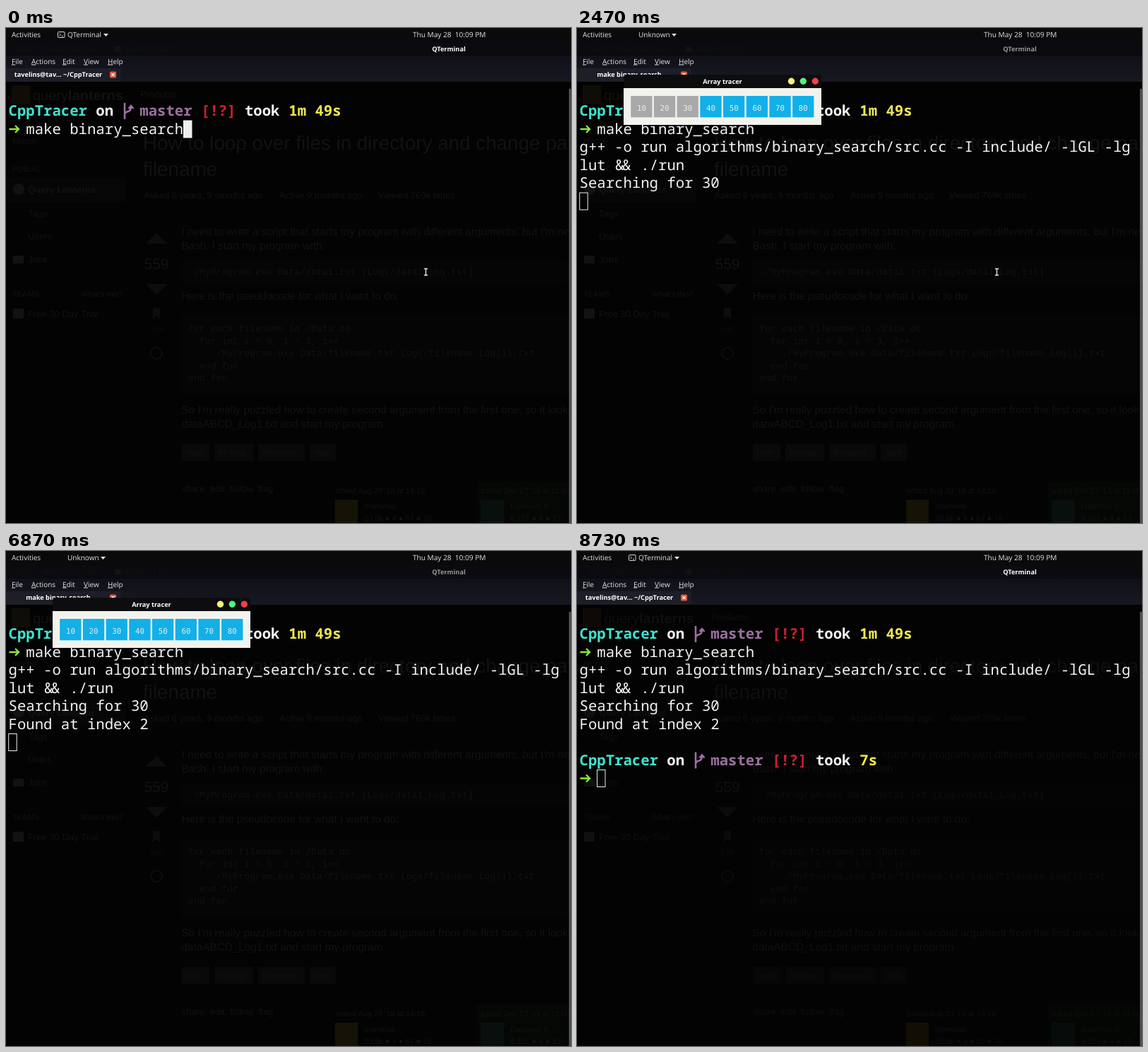
These frames come from a looping animation (800x700 px, 9790 ms). An HTML page:

```html
<!DOCTYPE html>
<html lang="en">
<head>
<meta charset="utf-8">
<title>Binary search tracer</title>
<style>
html, body { margin: 0; width: 100%; height: 100%; overflow: hidden; background: #000; }
svg { display: block; width: 800px; height: 700px; }
text { white-space: pre; text-rendering: geometricPrecision; }
.ui { font: 10px "Open Sans", "Noto Sans", sans-serif; fill: #e4e4e4; }
.b { font-weight: 700; font-size: 9.2px; fill: #fff; }
.mid { text-anchor: middle; }
.u { text-decoration: underline; }
.term { font: 20.65px "Noto Sans Mono", "DejaVu Sans Mono", monospace; fill: #f4f4f4; }
.prompt { font-weight: 700; }
.teal { fill: #41e2d0; }
.purple { fill: #9c6f9f; }
.red { fill: #cf2030; }
.yellow { fill: #efe64c; }
.page { font: 15.3px "Liberation Sans", Arial, sans-serif; fill: #111211; }
.page .s { font-size: 13px; }
.page .xs { font-size: 11px; }
.page .code { font: 13.2px "Liberation Mono", monospace; }
.page .icon { fill: #0c0d0c; }
.cell text { font: 10.8px "DejaVu Sans Mono", monospace; fill: #e4eef2; text-anchor: middle; }
</style>
</head>
<body>
<svg viewBox="0 0 800 700">
  <defs>
    <linearGradient id="bar" x2="0" y2="1">
      <stop offset="0" stop-color="#101018"/><stop offset="1" stop-color="#181822"/>
    </linearGradient>
    <g id="arrow" fill="none" stroke="#8fe834" stroke-width="2.3">
      <path d="M4.5 143H18M13 138L18 143L13 148"/>
    </g>
    <g id="prompt" class="term prompt">
      <text x="3.5" y="124"><tspan class="teal">CppTracer</tspan> on</text>
      <path d="M168 106V129M168 123Q168 119 173 118Q177 117 177 111M173.500 114L177 110L180.500 114" fill="none" stroke="#9c6f9f" stroke-width="2.6"/>
      <text x="189.300" y="124"><tspan class="purple">master</tspan> <tspan class="red">[!?]</tspan> took</text>
    </g>
  </defs>

  <rect width="800" height="700" fill="#020302"/>

  <!-- web page showing faintly through the terminal -->
  <g id="page" class="page">
    <rect x="8" y="81" width="26" height="27" fill="#100c07"/>
    <text x="38" y="102" font-size="20">query<tspan font-weight="700">lanterns</tspan></text>
    <text class="s" x="190" y="98">Products</text>
    <rect y="212" width="169" height="34" fill="#050605"/>
    <text class="s" x="9" y="164">Home</text>
    <text class="xs" x="9" y="203">PUBLIC</text>
    <circle cx="18" cy="228" r="8"/>
    <text class="s" x="31" y="233" font-weight="700">Query Lanterns</text>
    <text class="s" x="31" y="267">Tags</text>
    <text class="s" x="31" y="299">Users</text>
    <rect x="10" y="322" width="15" height="11"/>
    <text class="s" x="31" y="332">Jobs</text>
    <text class="xs" x="9" y="380">TEAMS</text>
    <text class="xs" x="106" y="380">What's this?</text>
    <rect x="10" y="397" width="15" height="14"/>
    <text class="s" x="31" y="409">Free 30 Day Trial</text>

    <g font-size="27.8">
      <text x="194" y="172">How to loop over files in directory and change path and</text>
      <text x="194" y="209">filename</text>
    </g>
    <text class="s" x="195" y="241">Asked 6 years, 9 months ago</text>
    <text class="s" x="387" y="241">Active 9 months ago</text>
    <text class="s" x="527" y="241">Viewed 769k times</text>
    <path class="icon" d="M198 305L213 290L228 305ZM198 362H228L213 377ZM208 396H218V412L213 407L208 412Z"/>
    <text class="mid" x="213" y="341" font-size="21">559</text>
    <text class="mid xs icon" x="213" y="430">188</text>
    <circle cx="213" cy="460" r="8" fill="none" stroke="#0c0d0c" stroke-width="2"/>

    <text x="248.500" y="293">I need to write a script that starts my program with different arguments, but I'm new to</text>
    <text x="248.500" y="313">Bash. I start my program with:</text>
    <rect x="248" y="329" width="552" height="32" fill="#040504"/>
    <text class="code" x="258" y="349">./MyProgram.exe Data/data1.txt [Logs/data1_Log.txt]</text>
    <text x="248.500" y="384">Here is the pseudocode for what I want to do:</text>
    <rect x="248" y="407" width="552" height="110" fill="#040504"/>
    <text class="code" x="258" y="429">for each filename in /Data do</text>
    <text class="code" x="258" y="447">  for int i = 0, i = 3, i++</text>
    <text class="code" x="258" y="464">    ./MyProgram.exe Data/filename.txt Logs/filename_Log{i}.txt</text>
    <text class="code" x="258" y="482">  end for</text>
    <text class="code" x="258" y="499">end for</text>
    <text x="248.500" y="545">So I'm really puzzled how to create second argument from the first one, so it looks like</text>
    <text x="248.500" y="565">dataABCD_Log1.txt and start my program.</text>
    <path d="M249 588H288V612H249ZM295 588H350V612H295ZM357 588H423V612H357ZM430 588H467V612H430Z" fill="#080908"/>
    <text class="xs" x="255" y="604">bash</text>
    <text class="xs" x="301" y="604">for-loop</text>
    <text class="xs" x="363" y="604">filenames</text>
    <text class="xs" x="436" y="604">shell</text>
    <text class="s" x="249" y="656">share  edit  follow  flag</text>
    <rect x="667" y="641" width="133" height="59" fill="#050705"/>
    <text class="xs" x="466" y="658">edited Aug 20 '18 at 14:18</text>
    <text class="xs" x="672" y="658">asked Dec 27 '13 at 11:00</text>
    <rect x="466" y="667" width="32" height="33" fill="#151306"/>
    <rect x="672" y="667" width="33" height="33" fill="#080f0d"/>
    <text class="xs" x="507" y="680">mornelak</text>
    <text class="xs" x="507" y="697">20.8k ● 4 ● 67 ● 76</text>
    <text class="xs" x="714" y="680">Dalvenor B</text>
    <text class="xs" x="714" y="697">6,101 ● 4 ● 13</text>
  </g>

  <!-- desktop bar and terminal chrome -->
  <rect width="800" height="20" fill="#0a0a0b"/>
  <rect y="20" width="800" height="20" fill="#0a0a0f"/>
  <g class="page">
    <text class="xs" x="18" y="34">bash - How to loop over</text>
    <circle cx="158" cy="30" r="5"/>
    <text class="xs" x="168" y="34">tavelins's files</text>
  </g>
  <rect y="39" width="800" height="37" fill="url(#bar)"/>
  <rect y="57" width="162" height="19" fill="#1e1e28"/>
  <rect x="797" y="86" width="3" height="614" fill="#4e4e50"/>
  <g class="ui">
    <text x="8" y="13.300">Activities</text>
    <text x="576" y="13.300" font-size="10.1">Thu May 28  10:09 PM</text>
    <g data-on="0-1330 7730-9790">
      <rect x="73.500" y="5.500" width="9.500" height="8" rx="1" fill="none" stroke="#d8d8d8"/>
      <path d="M75.500 7.500L77.500 9.500L75.500 11.500M79 11.500H81" fill="none" stroke="#d8d8d8"/>
      <text x="87" y="13.300">QTerminal</text>
      <path d="M138 8H145L141.500 12Z"/>
    </g>
    <g data-on="1330-7730">
      <text x="87" y="13.300">Unknown</text>
      <path d="M134 8H141L137.500 12Z"/>
    </g>
    <text id="title" class="b mid" x="627" y="32.500">QTerminal</text>
    <text x="8" y="50.500"><tspan class="u">F</tspan>ile</text>
    <text x="36" y="50.500"><tspan class="u">A</tspan>ctions</text>
    <text x="80" y="50.500"><tspan class="u">E</tspan>dit</text>
    <text x="110" y="50.500"><tspan class="u">V</tspan>iew</text>
    <text x="144" y="50.500"><tspan class="u">H</tspan>elp</text>
    <text class="b mid" x="74" y="69" data-on="0-470 7800-9790">tavelins@tav... ~/CppTracer</text>
    <text class="b mid" x="74" y="69" data-on="470-7800">make binary_search</text>
    <rect x="147" y="61.500" width="9" height="9" rx="1.500" fill="#dc5a3e"/>
    <path d="M149.500 64L153.500 68M153.500 64L149.500 68" stroke="#fff" stroke-width="1.200"/>
  </g>

  <!-- terminal contents -->
  <use href="#prompt"/>
  <text class="term prompt yellow" x="400.300" y="124">1m 49s</text>
  <use href="#arrow"/>
  <g class="term">
    <text x="28.300" y="149.500">make binary_search</text>
    <g data-on="530-9790">
      <text x="3.500" y="175">g++ -o run algorithms/binary_search/src.cc -I include/ -lGL -lg</text>
      <text x="3.500" y="200.500">lut</text>
      <text x="54" y="200.500" letter-spacing="-2.5">&amp;&amp;</text>
      <text x="90.300" y="200.500">./run</text>
    </g>
    <text x="3.500" y="226" data-on="1400-9790">Searching for 30</text>
    <text x="3.500" y="251.500" data-on="6130-9790">Found at index 2</text>
  </g>
  <g data-on="7730-9790">
    <use href="#prompt" y="178.500"/>
    <text class="term prompt yellow" x="400.300" y="302.500">7s</text>
    <use href="#arrow" y="178.500"/>
  </g>
  <rect id="caret" width="11.500" height="24" stroke="#eee"/>

  <g id="win">
    <path d="M66 85V70Q66 66 70 66H342Q346 66 346 70V85Z" fill="#0d0d0f"/>
    <rect x="66" y="85" width="280" height="52" fill="#f3f3ee"/>
    <text class="ui b mid" x="206" y="79">Array tracer</text>
    <circle cx="303.500" cy="75.300" r="4.700" fill="#f3f27c"/>
    <circle cx="320.300" cy="75.300" r="4.700" fill="#55f27a"/>
    <circle cx="337.300" cy="75.300" r="4.700" fill="#f0404c"/>
    <g id="cells"></g>
  </g>

  <g id="mouse">
    <g id="beam" fill="none" stroke-linecap="square">
      <path d="M-2 -4.500H2M0 -4.500V4.500M-2 4.500H2" stroke="#000" stroke-width="3"/>
      <path d="M-2 -4.500H2M0 -4.500V4.500M-2 4.500H2" stroke="#eee" stroke-width="1.300"/>
    </g>
    <path id="resize" d="M-6 0L-1.500 -4V4ZM6 0L1.500 -4V4Z" fill="#111" stroke="#ddd" stroke-width=".8"/>
  </g>
</svg>
<script>
const LOOP = 9790, STEP = 200 / 3;
const NS = 'http://www.w3.org/2000/svg';
const $ = id => document.getElementById(id);
const show = (el, on) => { el.style.display = on ? '' : 'none'; };

// Times at which each cell turns blue; the found one turns gray again for a while.
const visited = [4270, 3400, 5130, 1600, 2470, 2470, 2470, 2470];
const isGray = (i, t) => t < visited[i] || (i === 2 && t >= 6070 && t < 6870);

function add(parent, tag, attrs) {
  const el = document.createElementNS(NS, tag);
  for (const k in attrs) el.setAttribute(k, attrs[k]);
  return parent.appendChild(el);
}

const cells = visited.map((_, i) => {
  const x = 76.2 + i * 32.7;
  const g = add($('cells'), 'g', { class: 'cell' });
  const box = add(g, 'rect', { x, y: 96, width: 30.3, height: 30.3 });
  add(g, 'text', { x: x + 15.2, y: 116.5 }).textContent = (i + 1) * 10;
  return box;
});

const timed = [...document.querySelectorAll('[data-on]')].map(el => ({
  el, spans: el.dataset.on.split(' ').map(s => s.split('-').map(Number))
}));

// start time, row, column, solid
const carets = [
  [0, 1, 20, true], [470, 2, 0, true], [530, 4, 0, true], [1330, 4, 0, false],
  [1400, 5, 0, false], [6130, 6, 0, false], [7730, 8, 2, false]
];

// time, x, y
const path = [
  [3860, 594.5, 345], [4260, 343, 128], [4400, 346, 66],
  [4530, 352, 97], [4930, 352, 97], [5800, 812, 706]
];

function mouseAt(t) {
  if (t <= path[0][0]) return path[0].slice(1);
  for (let i = 1; i < path.length; i++) {
    const [t0, x0, y0] = path[i - 1], [t1, x1, y1] = path[i];
    if (t < t1) {
      const p = (t - t0) / (t1 - t0), e = p * p * (3 - 2 * p);
      return [x0 + (x1 - x0) * e, y0 + (y1 - y0) * e];
    }
  }
  return path[path.length - 1].slice(1);
}

function drawWindow(t) {
  const win = $('win');
  const open = Math.min(1, (t - 1340) / 200), shut = Math.max(0, (t - 7610) / 180);
  const on = open > 0 && shut < 1;
  show(win, on);
  if (!on) return;
  const e = 1 - Math.pow(1 - open, 4), s = 1 - 0.2 * shut;
  const sx = (0.01 + 0.99 * e) * s, sy = (0.05 + 0.95 * e) * s;
  win.setAttribute('transform', `translate(206 101.5) scale(${sx} ${sy}) translate(-206 -101.5)`);
  win.setAttribute('opacity', e * (1 - shut));
  cells.forEach((c, i) => c.setAttribute('fill', isGray(i, t) ? '#a9a9a9' : '#12b0e8'));
}

function drawCaret(t) {
  const [, row, col, solid] = carets.filter(c => c[0] <= t).pop();
  const caret = $('caret');
  caret.setAttribute('x', 3.7 + col * 12.39);
  caret.setAttribute('y', 105.5 + row * 25.5);
  caret.setAttribute('fill', solid ? '#eee' : 'none');
}

function drawMouse(t) {
  const [x, y] = mouseAt(t);
  const edge = Math.abs(x - 345) < 5 && y < 140;
  $('mouse').setAttribute('transform', `translate(${x} ${y})`);
  show($('mouse'), t < 5800);
  show($('beam'), !edge);
  show($('resize'), edge);
}

function draw(now) {
  // The screen updates fifteen times a second.
  const t = Math.floor((now % LOOP + 4) / STEP) * STEP + 4;
  for (const { el, spans } of timed) show(el, spans.some(([a, b]) => t >= a && t < b));
  $('title').style.fill = t >= 1400 && t < 7730 ? '#969696' : '#fff';
  $('page').setAttribute('opacity', t >= 8530 ? 0.8 : 1);
  drawWindow(t);
  drawCaret(t);
  drawMouse(t);
}

let start;
function frame(now) {
  start ??= now;
  draw(now - start);
  requestAnimationFrame(frame);
}
draw(0);
requestAnimationFrame(frame);
</script>
</body>
</html>
```
